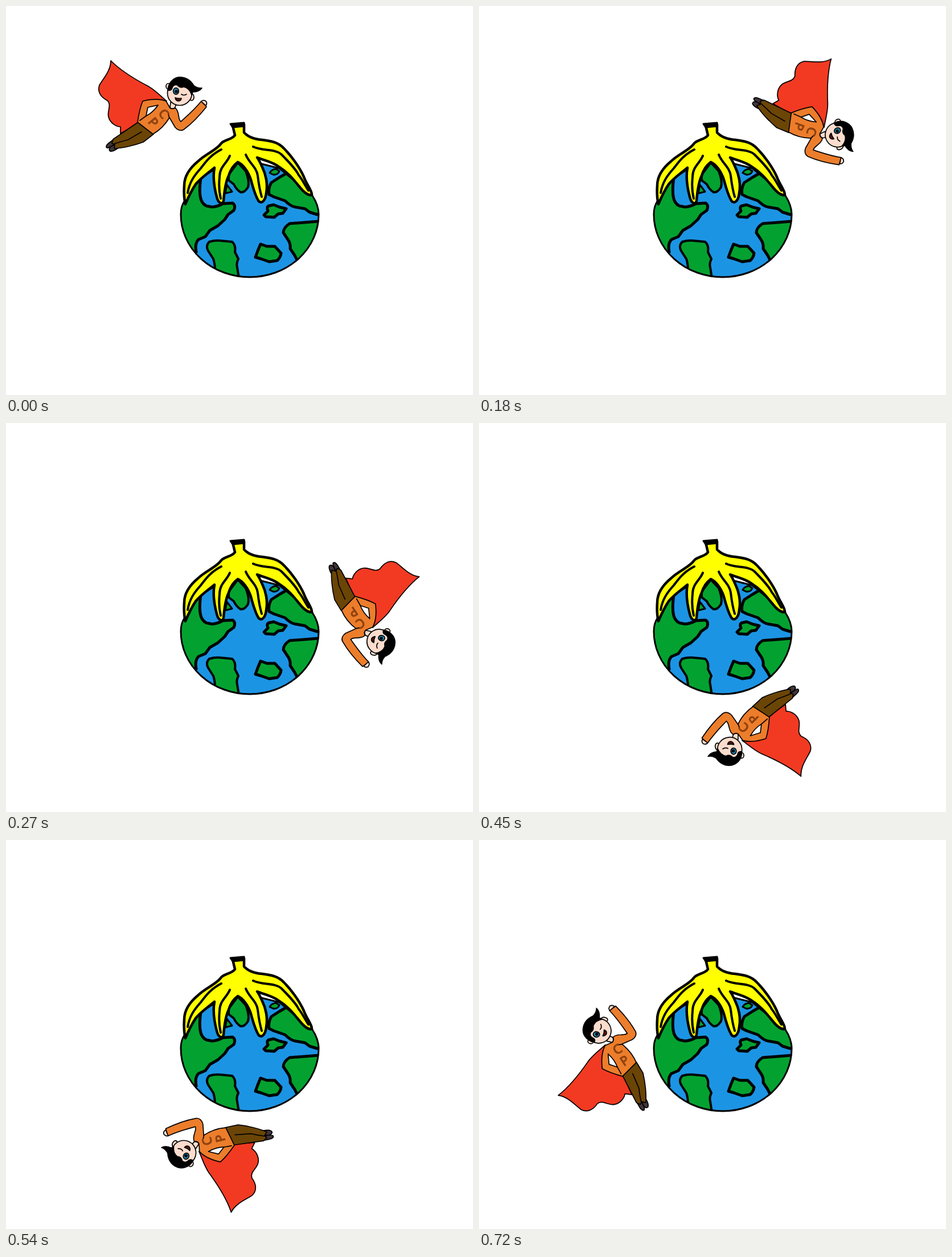
These frames come from a looping animation (820 px wide and 683 px high, 0.81 s). An HTML page:

```html
<!DOCTYPE html>
<html lang="en">
<head>
<meta charset="utf-8">
<title>Hero circling the globe</title>
<style>
  html, body { margin: 0; width: 100%; height: 100%; overflow: hidden; background: #fff; }
  svg { display: block; width: 100%; height: 100%; }
  path, circle, ellipse { stroke: #000; stroke-linejoin: round; stroke-linecap: round; }
  .line { fill: none; }
  .land { fill: #03a230; stroke-width: 5; }
  .banana { fill: #ff0; stroke-width: 5; }
  .hero { stroke-width: 1.7; }
  .skin { fill: #fbdccd; }
  .shirt { fill: #ec7d2b; }
  .shoe { fill: #40343a; }
  text { font: 22px "Noto Sans", sans-serif; fill: #8f4210; stroke: #8f4210; stroke-width: 1.3; text-anchor: middle; }
</style>
</head>
<body>
<svg viewBox="0 0 820 683">
  <defs>
    <path id="globe" d="M313 343Q307 352 307 366A121 110 0 0 0 549 366Q549 350 538 333L480 285 400 265 330 310Z"/>
    <clipPath id="inside"><use href="#globe"/></clipPath>
  </defs>

  <use href="#globe" fill="#1c94e4"/>
  <g class="land" clip-path="url(#inside)">
    <path d="M343 296Q339 318 341 334 343 347 352 351L362 353Q372 352 381 347L398 346Q404 350 400 359L390 366 384 375 372 386 358 394 350 405 338 410Q331 417 334 432L300 450 290 340Z"/>
    <path d="M391 296L407 275 421 290Q428 308 425 318 419 328 412 327 404 322 400 313L391 306Z" stroke-width="4"/>
    <path d="M388 314L397 326 385 329Z" stroke-width="3"/>
    <path d="M492 294L480 301 466 310Q460 320 462 331L470 335 490 342Q500 352 508 353L525 356 533 362 546 366 565 366 555 325Z"/>
    <path d="M463 293Q466 287 474 286L480 290Q477 297 469 296Z" stroke-width="3"/>
    <path d="M453 367L460 360Q457 353 461 351L470 349 480 353 492 356 486 364 478 365 471 371 456 370Z"/>
    <path d="M560 377L525 380 498 382Q487 389 487 398L495 410Q500 417 499 426L507 438 514 452 570 430Z"/>
    <path d="M357 414Q367 411 376 412L397 414Q404 420 402 432L408 444Q404 452 406 459L410 485 368 475Q367 452 364 444L355 430Q350 421 357 414Z" stroke-width="4"/>
    <path d="M447 418L458 422 472 422 483 434Q482 442 476 447L462 449 448 444 438 441 442 430Z"/>
  </g>
  <use href="#globe" fill="none" stroke-width="3"/>

  <g class="banana">
    <path d="M398 210L402 227C396 235 385 234 378 241C370 253 350 260 338 272C322 285 313 299 313 315C312 330 313 340 315 348C320 336 325 325 333 313C342 302 354 294 366 284C363 300 366 320 370 335C373 348 381 349 382 342C383 330 386 308 391 298C394 288 400 279 407 274C416 278 425 290 430 305C434 320 439 336 444 343C450 348 456 340 457 328C460 312 456 295 450 283C446 274 444 270 441 266C452 271 468 273 480 283C495 292 505 305 515 317C522 326 530 333 537 332C538 325 528 314 523 300C515 282 500 262 488 250C478 239 465 237 450 235C437 234 425 230 418 222L418 208Z" stroke-width="4.5"/>
    <path class="line" d="M378 252C360 261 351 273 342 285C330 298 322 310 319 328M393 263C388 276 375 282 375 300C373 320 375 330 377 338M421 261C427 276 440 283 442 298C444 315 446 325 449 335M434 247C450 255 470 250 483 260C495 272 508 285 514 297C520 304 525 315 531 324" stroke-width="4"/>
    <path d="M394 207L418 205 418 211 398 213Z" fill="#000" stroke-width="3"/>
  </g>

  <g id="hero" class="hero">
    <path d="M184 96C184 114 170 128 164 139C160 150 166 160 178 166C186 174 177 185 180 195C183 206 194 212 201 212L201 224 232 206 282 167C268 155 262 148 250 141C225 128 200 112 184 96Z" fill="#f23a22"/>
    <path class="shoe" d="M188 235L180 241Q174 246 177 249 181 250 190 243Z"/>
    <path class="shoe" d="M193 242L184 247Q179 252 183 255 188 256 196 250Z"/>
    <path d="M232 204L188 234 186 241 191 243 190 250C203 250 225 245 241 239L259 225Z" fill="#6b4506"/>
    <path class="line" d="M190 242Q205 237 214 235L238 221"/>
    <path class="skin" d="M289 169L288 179Q293 182 297 178L299 171Z"/>
    <path class="shirt" d="M281 167C268 162 252 164 240 167C236 177 233 190 231 204L258 225C270 218 280 208 287 196L297 213C301 218 307 220 312 217C327 206 341 191 352 177L343 167C331 182 318 193 307 203C304 201 304 198 303 192C302 185 300 181 297 179Q292 182 288 179Z"/>
    <path d="M267 174L249 178 246 193Q258 187 267 174Z" fill="#fff"/>
    <path class="line" d="M246 193L235 201M287 197L285 190"/>
    <path class="skin" d="M343 168Q345 164 351 167 354 171 351 175Z"/>
    <text transform="translate(277 189) rotate(50)" y="8">C</text>
    <text transform="translate(259 204) rotate(50)" y="8">P</text>
    <ellipse class="skin" cx="285" cy="141" rx="4" ry="5"/>
    <ellipse class="skin" cx="326" cy="160" rx="4" ry="6"/>
    <circle class="skin" cx="305" cy="153" r="21.5"/>
    <path d="M284 148C285 132 297 124 308 125C319 126 326 133 330 140Q337 145 344 144Q339 151 328 151L326 156C323 147 317 143 312 142Q306 145 301 139 295 137 292 143 291 149 284 148Z"/>
    <ellipse cx="298.500" cy="149.500" rx="4.800" ry="5.600" fill="#238fb8"/>
    <circle cx="299" cy="150" r="2"/>
    <path class="line" d="M308 155Q312 158 317 155"/>
    <path d="M297 161Q302 163 308 162 307 167 302 167 298 166 297 161Z" fill="#571711"/>
  </g>
</svg>
<script>
  const STEP = 90;
  // Pivot position and turn of the hero at each step of the orbit.
  const poses = [
    [255, 166.25, 0], [457.25, 114.75, 24], [593, 189.5, 60],
    [647.75, 332.5, 96.5], [593, 489, 144.6], [489, 556, 175.4],
    [362.75, 559.25, 206.2], [265, 491, 242], [217.5, 386.5, 277]
  ];
  const hero = document.getElementById("hero");

  function draw() {
    const [x, y, turn] = poses[Math.floor(performance.now() / STEP) % poses.length];
    hero.setAttribute("transform", `translate(${x} ${y}) rotate(${turn}) translate(-255 -166.25)`);
    requestAnimationFrame(draw);
  }
  draw();
</script>
</body>
</html>
```
